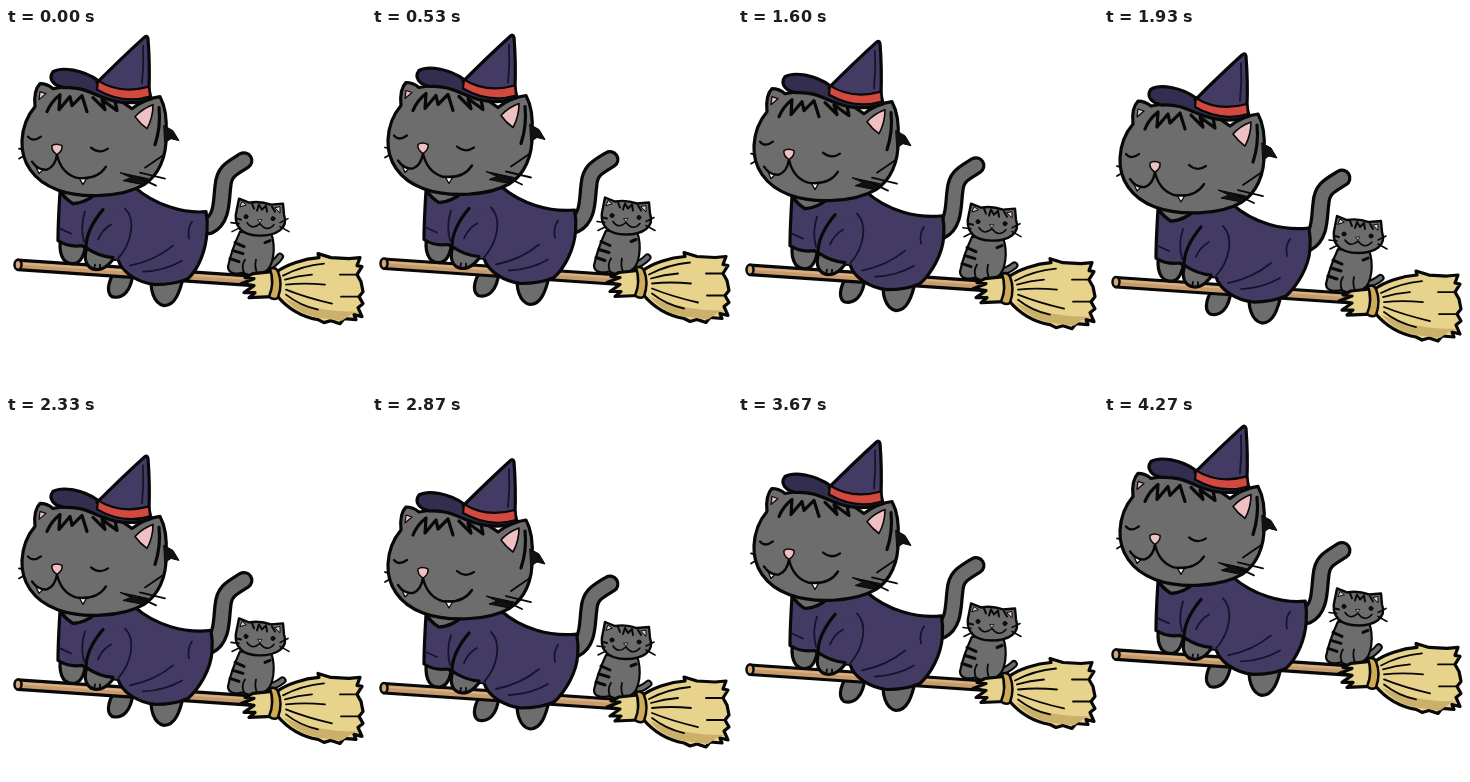
Recreate the animation shown at these times as an HTML page. Size 360x360 px, loop 4.34 s.

```html
<!DOCTYPE html>
<html lang="en">
<head>
<meta charset="utf-8">
<title>Witch cat on a broom</title>
<style>
html, body { margin: 0; height: 100%; overflow: hidden; background: #fff; }
svg { display: block; width: 100%; height: 100%; }
path, ellipse, circle { stroke: #080808; stroke-width: 3.200; stroke-linejoin: round; stroke-linecap: round; }
.fur { fill: #6d6d6e; }
.cloth { fill: #433b64; }
.pink { fill: #eec0c2; }
.straw { fill: #e7d38b; }
.ink { fill: #111; stroke-width: 1; }
.line { fill: none; }
.thin { stroke-width: 1.8; }
.fold { fill: none; stroke: #17132b; stroke-width: 1.8; }
</style>
</head>
<body>
<svg viewBox="0 0 360 360">
<defs>
  <path id="tail" d="M203 198C217 191 215 171 217 158C218 144 225 141 238 133"/>
  <path id="kitTail" d="M261 240Q269 236 274 229"/>
</defs>
<g id="flyer">
  <!-- big tail and hind feet -->
  <g fill="none" stroke-linecap="round">
    <use href="#tail" style="--w:1"/>
    <path style="stroke-width:19" d="M203 198C217 191 215 171 217 158C218 144 225 141 238 133"/>
    <path style="stroke:#6d6d6e;stroke-width:12.500" d="M203 198C217 191 215 171 217 158C218 144 225 141 238 133"/>
  </g>
  <path class="fur" d="M112 240C103 250 99 264 106 269C117 272 125 263 127 246Z"/>
  <path class="fur" d="M146 246C143 262 148 276 158 278C169 278 174 265 178 246Z"/>

  <!-- stick -->
  <path style="fill:#c79b6c" d="M12 232.500L255 249V258.500L12 242Z"/>
  <path class="line" style="stroke:#d8b184;stroke-width:2" d="M18 236L240 251"/>
  <ellipse cx="12" cy="237" rx="3.500" ry="5" style="fill:#d2a679;stroke-width:2.500"/>

  <!-- kitten -->
  <g>
    <g id="wag">
      <path class="line" style="stroke-width:8" d="M261 240Q269 236 274 229"/>
      <path class="line" style="stroke:#6d6d6e;stroke-width:4" d="M261 240Q269 236 274 229"/>
    </g>
    <path class="fur" style="stroke-width:2.200" d="M234 204C229 215 224 229 222 239C222 246 230 247 237 245C244 249 254 249 259 244C268 239 270 219 265 205Z"/>
    <path class="line" style="stroke-width:3" d="M229 215L238 219M227 223L237 226M224 231L233 234M264 213L259 215"/>
    <path class="line thin" d="M238 245Q235 238 239 232M252 247Q248 240 250 232"/>
    <path class="fur" style="stroke-width:2.400" d="M231 181L233 171L243 175Q254 173 265 177L277 176L278 187C283 201 270 208 254 208C236 208 226 199 231 181Z"/>
    <path class="pink" style="stroke-width:1" d="M234 179L236 174L240 177ZM269 180L274 179L274 185Z"/>
    <path class="line" style="stroke-width:2" d="M246 176L248 181M251 183L253 177L256 182L260 178L261 184M266 179L269 184M231 191L235 192"/>
    <circle class="ink" cx="240" cy="189" r="2"/>
    <circle class="ink" cx="267" cy="191" r="2"/>
    <path class="pink" style="stroke-width:.8" d="M252 192H256L254 195Z"/>
    <path class="line" style="stroke-width:1.600" d="M241 195Q246 203 254 196Q261 205 268 197M274 195L282 191M274 199L283 204M233 196L225 195M234 200L226 204"/>
  </g>

  <!-- brush -->
  <path class="straw" d="M266 244L247 246L239 250L248 251L235 256L248 258L238 265L249 265L243 270L267 269Z"/>
  <path class="straw" d="M271 244C280 237 298 231 313 230L312 226L325 230L343 231L354 230L351 238L356 239L351 247L355 254L357 264L353 269L357 276L352 280L356 289L348 287L350 292L338 291L334 296L325 293L318 295L312 292C295 289 281 280 271 268Z"/>
  <path style="fill:#cbb06c;stroke:none" d="M278 270Q308 284 353 284L346 286L336 293L312 290Q291 286 278 270Z"/>
  <path class="line thin" d="M277 248Q296 238 318 236M279 252Q292 248 306 247M280 257Q298 255 319 257M280 262Q300 270 326 276M280 267Q294 278 312 282M334 247L351 247M335 269L353 269"/>
  <path style="fill:#cfab58;stroke-width:2.500" d="M264 241Q270 239 272 244Q277 256 272 270Q268 273 263 269Q269 255 264 241Z"/>

  <!-- far arm, dress, near arm -->
  <path class="fur" d="M55 208C52 224 56 236 66 236C75 237 79 226 80 214Z"/>
  <path id="dress" class="cloth"/>
  <path class="fold" d="M124 238Q149 233 167 218M137 244Q159 243 176 233M186 194Q181 201 183 211M79 184Q74 199 78 214M54 201L65 206"/>
  <path class="fur" d="M81 220C77 231 80 241 90 242C99 242 104 236 109 229Z"/>
  <path class="line thin" d="M88 242L89 237M94 241L94 237"/>
  <path class="cloth" style="stroke:none" d="M96 184C86 195 80 209 80 220Q93 229 113 232L126 205L122 184Z"/>
  <path class="line" d="M97 182C86 195 80 209 80 220Q93 229 107 230"/>
  <path class="fold" d="M119 181C130 192 126 215 112 231M92 212Q96 202 105 197"/>
  <path class="fur" d="M54 163Q59 171 67 176Q80 175 90 166Z"/>

  <!-- head -->
  <path class="fur" d="M29 79C28 69 30 60 34 56Q41 56 47 61C72 56 104 64 126 81Q139 71 154 69C160 80 161 93 160 107C161 130 152 148 138 157C116 170 75 171 51 162C27 153 15 134 16 113Q17 93 29 79Z"/>
  <path class="pink" style="stroke-width:1.600" d="M147 77Q136 81 129 89Q134 96 141 101Q147 90 147 77Z"/>
  <path class="line" d="M153 80Q155 99 149 117"/>
  <path class="pink" style="stroke-width:1.200" d="M34 64L33 72L40 66Z"/>
  <path class="ink" d="M158 98L167 103L173 113L165 111L159 115Z"/>
  <path class="line" d="M41 84Q45 74 54 67L53 82L64 69L66 78L76 68L81 84M87 70L99 82L96 72L111 83L109 73"/>
  <path class="ink" d="M142 151L114 145L125 150L117 153L137 157Z"/>
  <path class="line" style="stroke-width:2.200" d="M22 109Q27 115 35 109M85 120Q93 127 102 121"/>
  <path style="fill:#fff;stroke-width:1.300" d="M30 139L33 146L37 142ZM73 150L77 157L81 150Z"/>
  <path class="line" style="stroke-width:2.400" d="M26 134Q32 143 41 142Q49 139 51 127Q55 145 70 150Q91 153 100 139"/>
  <path class="pink" style="stroke-width:1.500" d="M46 118Q50 115 56 118Q57 123 51 127Q45 123 46 118Z"/>
  <path class="line thin" d="M17 122L13 121M18 128L13 131M139 140L158 127M134 145L159 151M133 150L150 158"/>

  <!-- hat -->
  <path d="M92 53C77 42 56 39 47 44C42 51 47 58 58 60C76 59 84 65 95 69Q122 80 145 71L142 57Z" style="fill:#332d4f"/>
  <path class="cloth" d="M91 55Q116 30 138 10Q141 7 142 11Q144 36 143 63Q117 74 91 55Z"/>
  <path style="fill:#d3493f;stroke-width:2.200" d="M92 53Q114 67 143 59L144 69Q117 77 91 62Z"/>
  <path class="fold" d="M137 18Q138 37 136 56"/>
</g>
</svg>
<script>
const LOOP = 4340, STEPS = 65;
const [flyer, wag, dress] = ['flyer', 'wag', 'dress'].map(id => document.getElementById(id));
const ease = u => (1 - Math.cos(Math.PI * Math.min(1, Math.max(0, u)))) / 2;

function draw(now) {
  const phase = Math.floor(now % LOOP / LOOP * STEPS) / STEPS;
  // hover, sink, then rise back past the end of the loop
  const t = phase * LOOP + (phase < 0.1 ? LOOP : 0);
  const dip = ease((t - 1150) / 1450) - ease((t - 2600) / 1960);
  flyer.setAttribute('transform', `translate(0 ${37.5 * dip - 1.5})`);

  const breeze = Math.sin(Math.PI * phase) ** 0.6;
  const x = 200 + 5 * breeze, y = 184 - breeze;
  dress.setAttribute('d', `M54 164C53 180 52 199 52 213Q63 220 76 218L81 221
    Q94 231 112 232C116 245 132 255 149 257Q168 257 182 251
    C193 241 ${x} 222 ${x + 1} 204Q${x + 2} 194 ${x} ${y}
    C179 186 149 178 128 159Q110 166 90 166Q80 175 67 176Q59 171 54 164Z`);
  wag.setAttribute('transform', `rotate(${16 * breeze} 261 240)`);
  requestAnimationFrame(draw);
}
draw(0);
</script>
</body>
</html>
```
